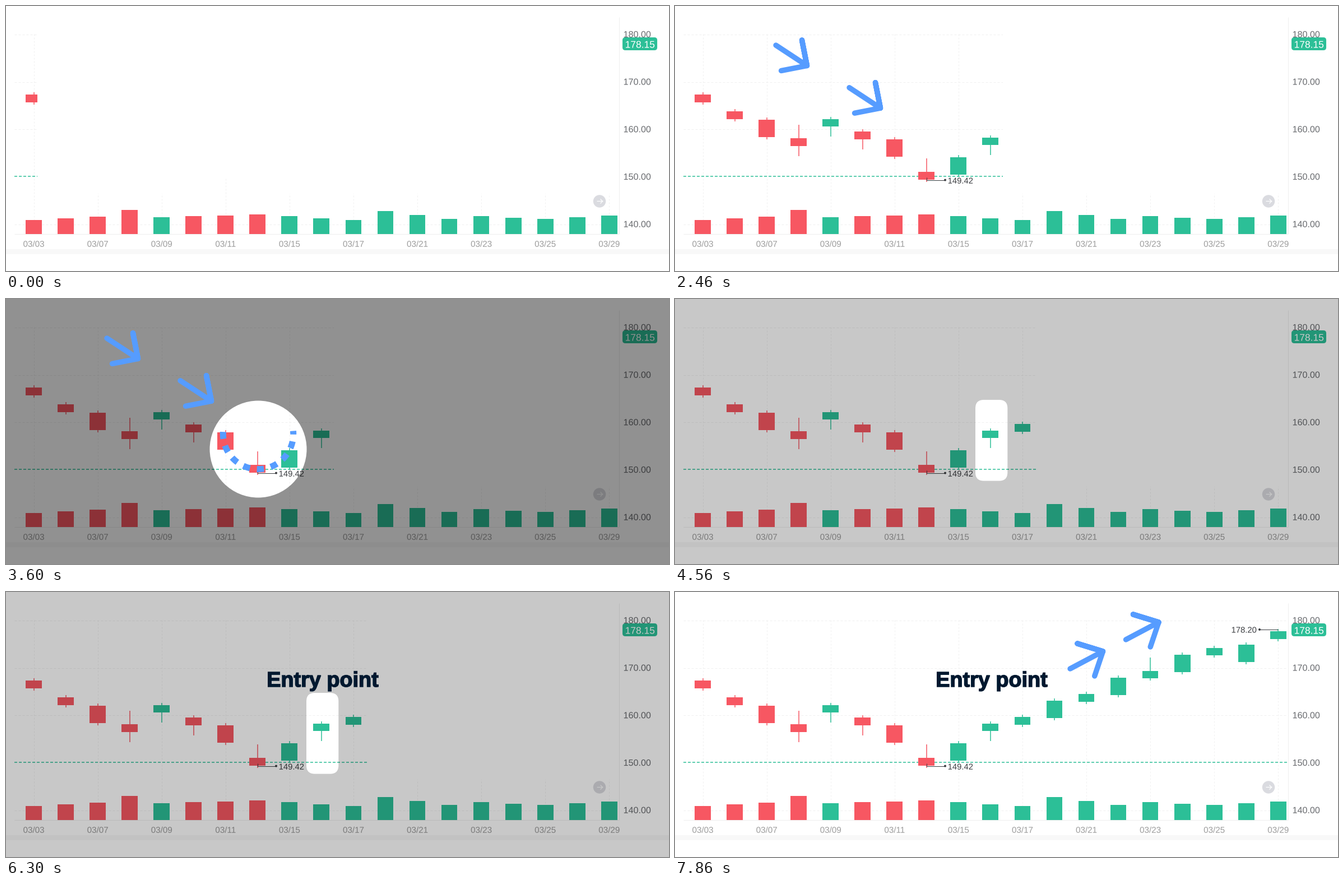
A matplotlib script for the animation above (8.4 s loop, 1183 by 473 pixels).

```python
import numpy as np
import matplotlib.pyplot as plt
from matplotlib.animation import FuncAnimation
from matplotlib.patches import BoxStyle, Circle, FancyBboxPatch, PathPatch, Rectangle
from matplotlib.path import Path
from matplotlib.textpath import TextPath
from matplotlib.transforms import Bbox, TransformedBbox

W, H = 1183, 473
FRAMES, STEP = 140, 60
LEFT, RIGHT, BASE = 15, 1093, 407

RED, GREEN, BLUE, NAVY = "#f75762", "#2cbf97", "#569cff", "#00182f"
GRID, RULE, AXIS, DATE, NOTE = "#f0f0f0", "#eeeeee", "#6a6c70", "#9d9d9d", "#3c3e42"
DIM = 0.432

plt.rcParams["lines.scale_dashes"] = False

# 72 dpi makes one point equal one pixel
fig = plt.figure(figsize=((W + 0.01) / 72, (H + 0.01) / 72), dpi=72, facecolor="white")
ax = fig.add_axes([0, 0, 1, 1])
ax.set_xlim(0, W)
ax.set_ylim(H, 0)
ax.axis("off")


def rect(x0, y0, x1, y1, color, z):
    return ax.add_patch(Rectangle((x0, y0), x1 - x0, y1 - y0, fc=color, lw=0, zorder=z))


def disc(x, y, r, color, z):
    return ax.add_patch(Circle((x, y), r, fc=color, lw=0, zorder=z))


def line(xs, ys, color, lw, z, **kw):
    kw.setdefault("solid_capstyle", "butt")
    return ax.plot(xs, ys, color=color, lw=lw, zorder=z, **kw)[0]


def text(cx, base, s, size, color, z, bold=False):
    """Vector text, centred on its inked width."""
    prop = {"family": "Liberation Sans", "weight": "bold" if bold else "normal"}
    p = TextPath((0, 0), s, size=size, prop=prop)
    box = p.get_extents()
    verts = p.vertices * [1, -1] + [cx - (box.x0 + box.x1) / 2, base]
    patch = PathPatch(Path(verts, p.codes), fc=color, ec=color,
                      lw=1.5 if bold else 0, joinstyle="miter", zorder=z)
    return ax.add_patch(patch)


def shade(hole):
    """Dark sheet over the stage with a cut-out."""
    sheet = Path([(-5, -5), (-5, H + 5), (W + 5, H + 5), (W + 5, -5), (-5, -5)],
                 [Path.MOVETO] + [Path.LINETO] * 3 + [Path.CLOSEPOLY])
    both = Path.make_compound_path(sheet, hole)
    return ax.add_patch(PathPatch(both, fc="black", lw=0, alpha=0, zorder=5))


def arrow(tail, tip, barb1, barb2, shift=(0, 0)):
    pts = np.array([tail, tip, barb1, tip, barb2]) + shift
    art = line(pts[:, 0], pts[:, 1], BLUE, 9.5, 6,
               solid_capstyle="round", solid_joinstyle="round")
    return art, pts[:, 0].min() - 5, pts[:, 0].max() + 5


def wipe(art, x):
    art.set_clip_box(TransformedBbox(Bbox([[0, 0], [x, H]]), ax.transData))


def ramp(f, a, b):
    return float(np.clip((f - a) / (b - a), 0, 1))


def follow(i, *knots):
    """Height of a polyline through (index, value) knots."""
    return np.interp(i, *zip(*knots))


def day_x(i):
    return 49.5 + 57.04 * i


def price_y(p):
    return 50.9 + (180 - p) * 8.47


# Grid
for p in (180, 170, 160, 140):
    line([LEFT, RIGHT], [price_y(p)] * 2, GRID, 1, 1, dashes=(4, 3))
for i in range(0, 19, 2):
    line([day_x(i)] * 2, [50, BASE], GRID, 1, 1, dashes=(3, 3))
line([day_x(6)] * 2, [308, 335], GRID, 1, 4, dashes=(3, 3))
line([LEFT, RIGHT], [304.2] * 2, GREEN, 1.5, 1.5, dashes=(5, 3))

# Weekdays of the month, each with a candle and a volume bar
DAYS = [d for d in range(3, 30) if d % 7 not in (5, 6)]
TALL, TOP_WICK, LOW_WICK = {2, 6, 8, 11, 13, 15, 17}, {3, 7, 14}, {3, 4, 5, 9}

for i, day in enumerate(DAYS):
    x, color = day_x(i), RED if i < 8 and i != 4 else GREEN
    mid = follow(i, (0, 165.3), (1, 195), (3, 243), (4, 208.5), (6, 254), (7, 303),
                 (8, 286), (9, 241.5), (10, 230), (16, 106.5), (17, 110), (18, 77))
    half = 15.5 if i in TALL else 6.8
    high = mid - half - (24 if i in TOP_WICK else 4)
    low = mid + half + (18 if i in LOW_WICK else 4)
    volume = follow(i, (0, 25), (2, 31), (3, 43), (4, 30), (7, 35), (10, 25),
                    (11, 40.5), (13, 27), (14, 32), (16, 26.5), (18, 33))
    line([x, x], [high, low], color, 1.5, 2)
    rect(x - 14.4, mid - half, x + 14.4, mid + half, color, 2)
    rect(x - 14.4, BASE - volume, x + 14.4, BASE, color, 2)
    if i % 2 == 0:
        text(x, 429.8, f"03/{day:02d}", 15.2, DATE, 4)

# Price notes
low_note = [
    line([day_x(7)] * 2 + [482], [306, 310.6, 310.6], NOTE, 1, 4),
    disc(482, 310.6, 2, NOTE, 4),
    text(509.5, 316.8, "149.42", 14.8, NOTE, 4),
]
line([1043, day_x(18)], [67, 67], NOTE, 1, 2)
disc(1043, 67, 2, NOTE, 2)
text(1015.5, 72.6, "178.20", 14.8, NOTE, 2)

cover = rect(56, 30, RIGHT, 335, "white", 3)

# Axes and fixed furniture
line([RIGHT + 0.5] * 2, [20, BASE], RULE, 1, 4)
line([LEFT, RIGHT], [BASE + 0.5] * 2, RULE, 1, 1)
rect(0, 434, W, 443, "#f8f8f8", 1)
for p in range(140, 181, 10):
    text(1126.5, price_y(p) + 5.1, f"{p}.00", 16.1, AXIS, 4)
ax.add_patch(FancyBboxPatch((1100, 56), 62, 23, fc=GREEN, lw=0, zorder=4,
                            boxstyle="round,pad=0,rounding_size=5"))
text(1131.5, 74.6, "178.15", 17.4, "white", 4.1)
disc(1059, 348.5, 11.2, "#dadbe0", 4)
line([1053.5, 1064.5], [348.5, 348.5], "white", 1.2, 4.1)
line([1060.5, 1064.5, 1060.5], [344.5, 348.5, 352.5], "white", 1.2, 4.1)

# Highlights
round_shade = shade(Path.circle((450, 268), 86.5))
box_shade = shade(BoxStyle("Round", pad=0, rounding_size=15)(536, 180, 57.3, 144.6, 1))
arc = line([], [], BLUE, 11, 6, dashes=(12.5, 12.5), dash_capstyle="butt")
entry = text(566, 169, "Entry point", 37.8, NAVY, 6, bold=True)

down = ((180, 70), (235.5, 106.5), (226.5, 61), (189.5, 115.5))
up = ((705, 137), (763.5, 106), (718, 92), (748.7, 150))
# each arrow with the start of its five-step wipe
ARROWS = [
    (arrow(*down), 15), (arrow(*down, shift=(131, 75.7)), 20),
    (arrow(*up), 121), (arrow(*up, shift=(99.5, -52)), 126),
]


def update(f):
    reveal = (56 + 429 * ramp(f, 0, 14) + 100 * ramp(f, 38, 41)
              + 60 * ramp(f, 73, 75) + 448 * ramp(f, 105, 120))
    cover.set_x(reveal)
    cover.set_width(RIGHT - reveal)
    for art in low_note:
        wipe(art, reveal + 46)

    fade = 1 - ramp(f, 71, 73)
    round_shade.set_alpha(DIM * ramp(f, 45, 47) * fade)
    box_shade.set_alpha(DIM * ramp(f, 75, 77) * (1 - ramp(f, 104, 106)))

    for n, ((art, x0, x1), start) in enumerate(ARROWS):
        t = ramp(f, start, start + 5)
        art.set_visible(t > 0)
        art.set_alpha(fade if n < 2 else 1)
        wipe(art, x0 + (x1 - x0) * t)

    t = ramp(f, 47, 60)
    ang = np.radians(np.linspace(-3.5, -3.5 + 188.5 * t, 120))
    arc.set_data(450 - 62.7 * np.cos(ang), 241 + 62.7 * np.sin(ang))
    arc.set_visible(t > 0)
    arc.set_alpha(fade)

    t = ramp(f, 77, 82)
    entry.set_visible(t > 0)
    wipe(entry, 466 + 201 * t)
    return []


anim = FuncAnimation(fig, update, frames=FRAMES, interval=STEP,
                     init_func=lambda: update(0), repeat=True, repeat_delay=0)
plt.show()
```
